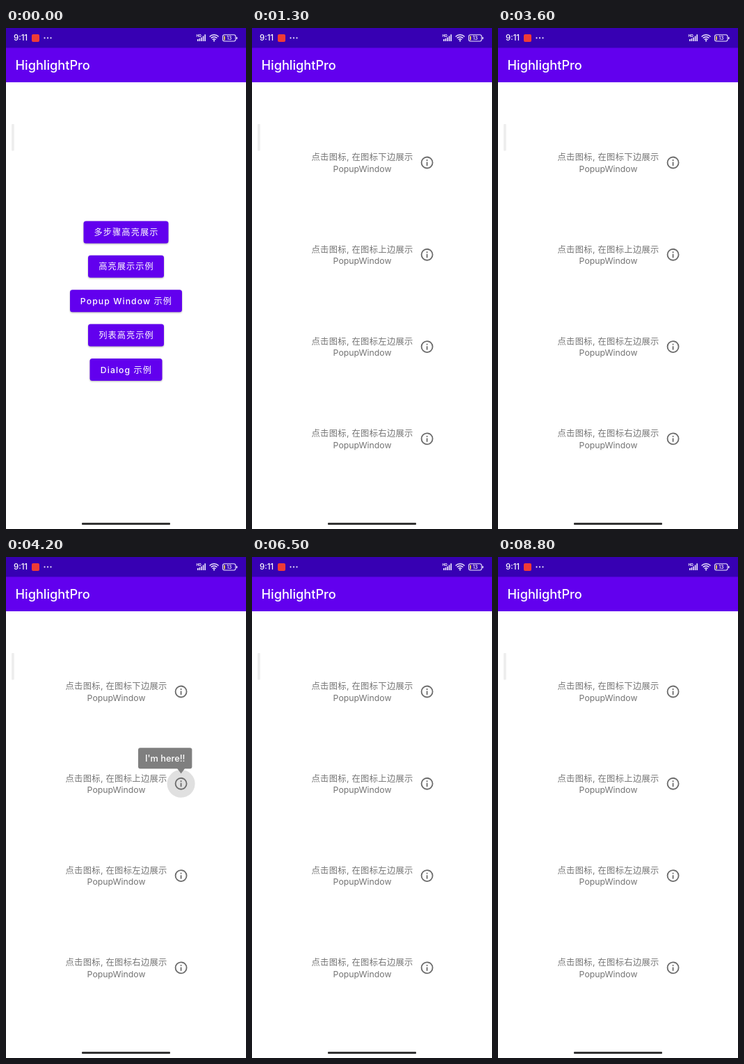
Write an HTML page that moves like this. It is 345 by 720 pixels and loops after 8.9 s.

```html
<!DOCTYPE html>
<html lang="zh-CN">
<head>
<meta charset="utf-8">
<title>HighlightPro</title>
<style>
  html, body { margin: 0; width: 100%; height: 100%; overflow: hidden; background: #fff; }
  svg { display: block; width: 345px; height: 720px; }
  text { font-family: Inter, "Noto Sans CJK SC", "Noto Sans CJK", sans-serif; fill: #fff; }
  .mid { text-anchor: middle; }
  .btn text { font-size: 12.2px; font-weight: 500; letter-spacing: 1.1px; }
  .btn { filter: drop-shadow(0 1px 1px rgba(0, 0, 0, .3)); }
  .row text { font-size: 12.3px; fill: #757575; }
  .row .cjk { letter-spacing: .3px; }
  .tip text { font-size: 12.8px; font-weight: 500; }
  .tip { fill: #7f7f7f; }
</style>
</head>
<body>
<svg id="stage" viewBox="0 0 345 720">
  <rect width="345" height="720" fill="#fff"/>
  <g id="menu"></g>
  <g id="list"></g>
  <g id="tips"></g>

  <rect width="345" height="78" fill="#6200ee"/>
  <rect width="345" height="28.5" fill="#3700b3"/>
  <text x="13.5" y="60" font-size="18.2" font-weight="500">HighlightPro</text>

  <g id="status" fill="#f1ebff">
    <text x="11" y="18.2" font-size="11.4" font-weight="500">9:11</text>
    <rect x="37" y="9" width="11" height="11" rx="2" fill="#ef3b36"/>
    <circle cx="55.5" cy="14.3" r="1.1"/>
    <circle cx="60" cy="14.3" r="1.1"/>
    <circle cx="64.5" cy="14.3" r="1.1"/>
    <text x="273.5" y="12.8" font-size="5" font-weight="700">HD</text>
    <path d="M275 16h1.6v3h-1.6zM277.6 15h1.6v4h-1.6zM280.2 13.5h1.6v5.5h-1.6zM282.8 11.5h1.6v7.5h-1.6zM285.4 9.3h1.6v9.7h-1.6z"/>
    <g fill="none" stroke="#f1ebff" stroke-width="1.4">
      <path d="M292.6 12.4a9.2 9.2 0 0 1 13 0M294.7 14.6a6.2 6.2 0 0 1 8.8 0M296.8 16.7a3.2 3.2 0 0 1 4.6 0"/>
      <rect x="311.6" y="9.8" width="18.4" height="9.2" rx="2.4" stroke-width="1.1"/>
    </g>
    <circle cx="299.1" cy="18.4" r="1.1"/>
    <rect x="331" y="12.7" width="1.5" height="3.6" rx=".7"/>
    <rect x="313.2" y="11.4" width="1.8" height="6" rx=".5" fill="#e8d25a"/>
    <text class="mid" x="320.8" y="17" font-size="7" font-weight="500">13</text>
  </g>

  <rect x="8" y="138" width="3.8" height="38.5" rx="1" fill="#eee"/>
  <rect x="109" y="711" width="127" height="3" rx="1" fill="#333"/>
</svg>
<script>
const LOOP = 8900, TICK = 100;
const ICON_X = 251.6;
const rowY = i => 193.5 + 132.27 * i;
const $ = id => document.getElementById(id);
const clamp = v => Math.min(1, Math.max(0, v));

const buttons = [
  ["多步骤高亮展示", 122], ["高亮展示示例", 109], ["Popup Window 示例", 161],
  ["列表高亮示例", 109], ["Dialog 示例", 104]
];
$("menu").innerHTML = buttons.map(([label, w], i) => {
  const y = 277.4 + 49.4 * i;
  const box = `x="${172.5 - w / 2}" y="${y}" width="${w}" height="32" rx="3.5"`;
  const press = i === 2 ? `<rect id="press" ${box} fill="#fff" opacity="0"/>` : "";
  return `<g class="btn"><rect ${box} fill="#6200ee"/>${press}
    <text class="mid" x="173" y="${y + 20.6}">${label}</text></g>`;
}).join("");

$("list").innerHTML = [..."下上左右"].map((side, i) => {
  const y = rowY(i);
  return `<g class="row">
    <circle id="ripple${i}" cx="${ICON_X}" cy="${y}" fill="#e0e0e0" opacity="0"/>
    <text class="mid cjk" x="158.6" y="${y - 3.2}">点击图标, 在图标${side}边展示</text>
    <text class="mid" x="158.6" y="${y + 13.2}">PopupWindow</text>
    <g transform="translate(${ICON_X} ${y})" fill="#6c6c6c">
      <circle r="8" fill="none" stroke="#6c6c6c" stroke-width="1.8"/>
      <path d="M-.9 -4.4h1.8v1.8h-1.8zM-.9 -.9h1.8v5.3h-1.8z"/>
    </g></g>`;
}).join("");

// Box position and arrow outline, both relative to the icon centre
const tips = [
  { x: -61.6, y: 21.5, arrow: "M0 14.5l6 8h-12z" },
  { x: -61.6, y: -51.6, arrow: "M0 -14.5l6 -8h-12z" },
  { x: -99, y: -15, arrow: "M-14 0l-8 -6v12z" },
  { x: 21.4, y: -15.5, arrow: "M14 0l8 -6v12z", w: 70.5, lines: 4 }
];
$("tips").innerHTML = tips.map(({ x, y, arrow, w = 77.4, lines = 1 }, i) => {
  const h = 30 + 18.6 * (lines - 1);
  let text = "";
  for (let n = 0; n < lines; n++)
    text += `<text class="mid" x="${x + w / 2}" y="${y + 19.8 + 18.6 * n}">I'm here!!</text>`;
  return `<g id="tip${i}" class="tip" transform="translate(${ICON_X} ${rowY(i)})" visibility="hidden">
    <path d="${arrow}"/><rect x="${x}" y="${y}" width="${w}" height="${h}" rx="3"/>${text}</g>`;
}).join("");

// Times in ms: touch, popup shown, popup hidden
const taps = [
  [2400, 2500, 3600], [3900, 4100, 4700], [5400, 5600, 6500], [7300, 7500, 8300]
];

function place(id, x, opacity) {
  $(id).setAttribute("transform", `translate(${x} 0)`);
  $(id).setAttribute("opacity", opacity);
}

function draw(t) {
  const p = clamp((t - 452) / 310);
  place("menu", -115 * p, 1 - p);
  place("list", 345 * (1 - p) ** 2, p);
  $("press").setAttribute("opacity", 0.22 * clamp((t - 50) / 250));

  taps.forEach(([touch, show, hide], i) => {
    const age = t - touch;
    const ripple = $("ripple" + i);
    ripple.setAttribute("r", 20 * clamp(0.6 + age * 0.0015));
    ripple.setAttribute("opacity", age < 0 ? 0 : clamp((600 - age) / 300));
    $("tip" + i).setAttribute("visibility", t >= show && t < hide ? "visible" : "hidden");
  });
}

function frame() {
  const t = performance.now() % LOOP;
  draw(Math.floor(t / TICK) * TICK);
  requestAnimationFrame(frame);
}
frame();
</script>
</body>
</html>
```
